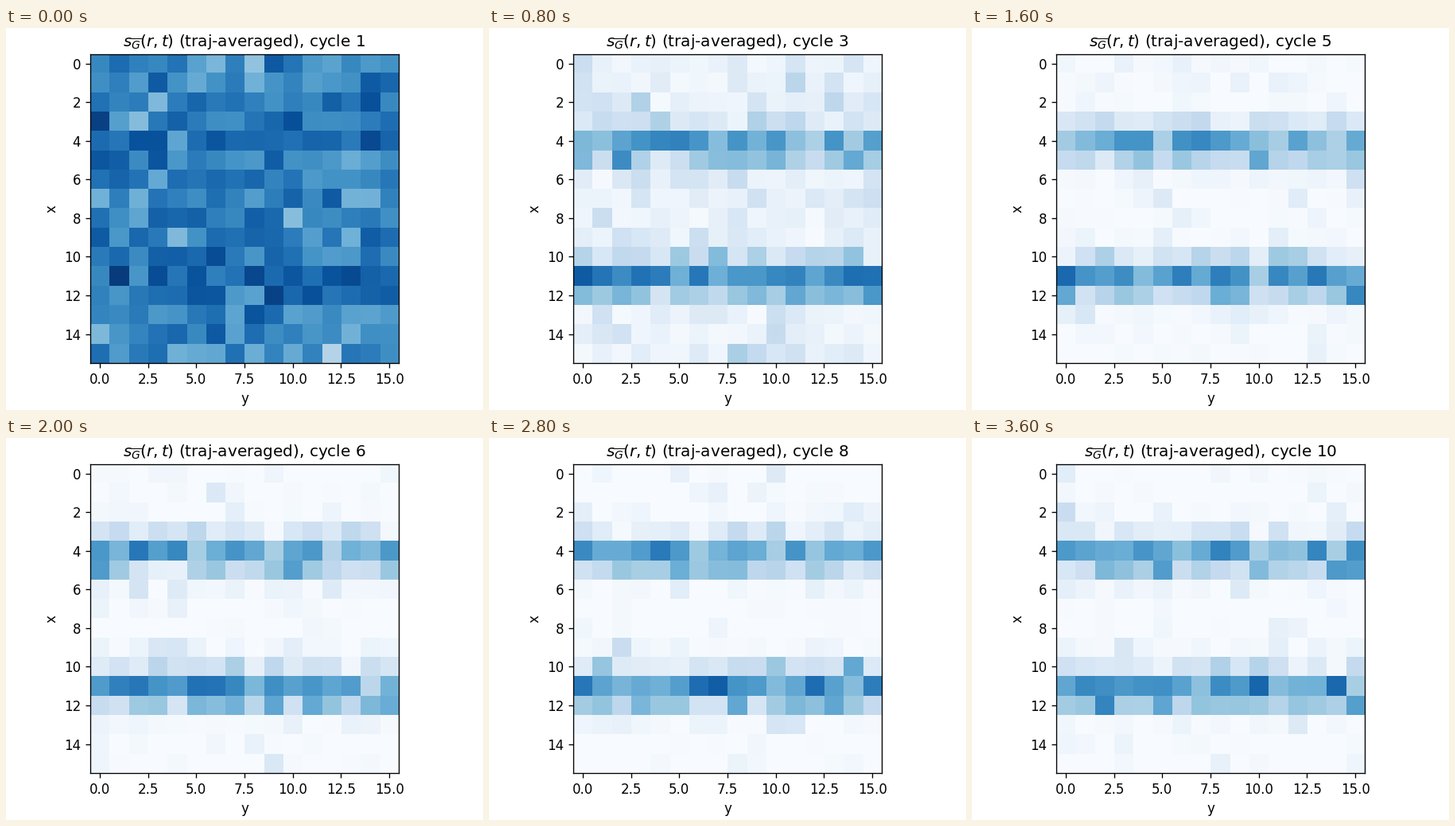
Write a matplotlib script that moves like this. It is 600x480 px and loops after 4 s.

```python
import numpy as np
import matplotlib.pyplot as plt
from matplotlib.animation import FuncAnimation

W, H, DPI = 600, 480, 120
N = 16
CYCLES = 10
SIDE = 388.4    # heat map edge in pixels
BOTTOM = 59.0
SPREAD = 18     # higher means less scatter around the row mean


def bump(x, center, height):
    return height * np.exp(-(x - center) ** 2)


def row_means(cycle):
    """A uniform start decays and leaves two bands."""
    x = np.arange(N)
    background = 0.012 + 0.65 * np.exp(-1.1 * (cycle - 1))
    bands = bump(x, 4.25, 0.55) + bump(x, 11.25, 0.6) + bump(x, 10, 0.05)
    return background + (1 - background) ** 1.3 * bands


def density(cycle):
    rng = np.random.default_rng(cycle)
    mean = row_means(cycle)[:, None]
    return rng.beta(mean * SPREAD, (1 - mean) * SPREAD, size=(N, N))


fig = plt.figure(figsize=(W / DPI, H / DPI), dpi=DPI)
ax = fig.add_axes([0.5 - SIDE / W / 2, BOTTOM / H, SIDE / W, SIDE / H])
image = ax.imshow(density(1), cmap="Blues", vmin=0, vmax=1)
ax.set_xlabel("y")
ax.set_ylabel("x")
title = ax.set_title("")


def update(i):
    cycle = i + 1
    image.set_data(density(cycle))
    title.set_text(rf"$s_{{\overline{{G}}}}(r,t)$ (traj-averaged), cycle {cycle}")
    return image, title


anim = FuncAnimation(fig, update, frames=CYCLES, interval=400, repeat=True, repeat_delay=0)
plt.show()
```
